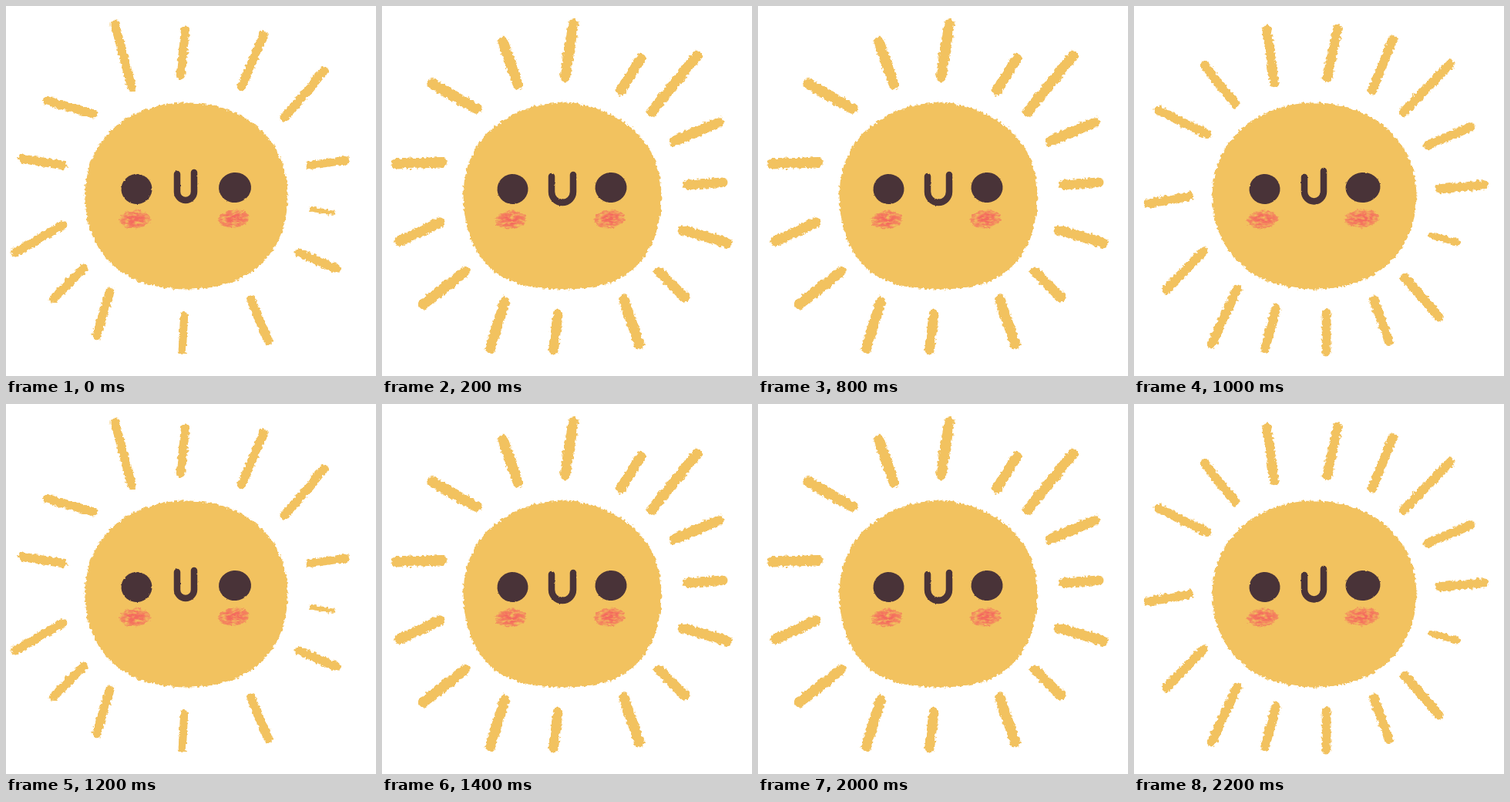
An HTML page that plays this animation: 480 by 480 pixels, repeating every 2400 ms.

```html
<!DOCTYPE html>
<html lang="en">
<head>
<meta charset="utf-8">
<title>Crayon sun</title>
<style>
  html, body { margin: 0; width: 100%; height: 100%; overflow: hidden; background: #fff; }
  svg { display: block; width: 100vw; height: 100vh; }
</style>
</head>
<body>
<svg id="stage" viewBox="0 0 480 480"></svg>
<script>
const STEP = 200;
const YELLOW = '#f2c25f', DARK = '#493338', PINK = '#f46a5e';
const CX = 234, CY = 246;

// Each ray: angle of its foot on the ring, heading (degrees clockwise from up), length
const poses = [
  {
    rx: 131.5, bulge: 0.03, sag: 0.01, eye: 21, cheek: 20,
    mouth: { left: 222, right: 244, topL: 218, topR: 216 },
    ring: 152, thick: 11.5,
    rays: [
      [333, 345, 93], [357, 6, 68], [27, 23, 82], [52, 40, 89], [76, 82, 56],
      [96, 101, 33], [117, 113, 62], [148, 157, 67], [181, 183, 53], [219, 197, 68],
      [235, 225, 65], [257, 240, 80], [284, 279, 62], [312, 286, 71]
    ]
  },
  {
    rx: 128.5, bulge: 0.035, sag: 0.035, eye: 20.5, cheek: 20,
    mouth: { left: 220, right: 248, topL: 221, topR: 219 },
    ring: 149, thick: 13.5,
    rays: [
      [1, 9, 80], [29, 32, 59], [47, 39, 104], [64, 67, 73], [85, 86, 56],
      [106, 106, 71], [128, 135, 57], [149, 161, 72], [182, 187, 57], [209, 197, 74],
      [232, 232, 80], [258, 245, 68], [286, 268, 69], [316, 299, 77], [338, 341, 69]
    ]
  },
  {
    rx: 132.5, bulge: 0.02, sag: 0.01, eye: 22.5, cheek: 22,
    mouth: { left: 221, right: 246, topL: 222, topR: 214 },
    ring: 149, thick: 12,
    rays: [
      [340, 352, 80], [6, 12, 74], [29, 22, 80], [47, 44, 96], [66, 67, 69],
      [87, 85, 67], [109, 105, 42], [132, 139, 77], [150, 160, 66], [174, 180, 59],
      [199, 195, 63], [220, 205, 88], [244, 224, 78], [270, 260, 63], [300, 296, 79],
      [319, 322, 73]
    ]
  }
];

const rad = deg => deg * Math.PI / 180;

// Ellipse that swells on its diagonals, more so towards the bottom
function body({ rx, bulge, sag }) {
  const points = [];
  for (let deg = 0; deg < 360; deg += 4) {
    const t = rad(deg);
    const r = 1 + (bulge + sag * Math.sin(t)) * Math.sin(2 * t) ** 2;
    points.push([CX + rx * r * Math.cos(t), CY + 0.5 + 121 * r * Math.sin(t)]);
  }
  return `<polygon fill="${YELLOW}" points="${points.join(' ')}"/>`;
}

function ray([angle, heading, length], { ring, thick }) {
  const a = rad(angle), h = rad(heading);
  const foot = ring + 9 * Math.sin(a) ** 2;
  const width = thick * Math.min(1, length / 60);
  const at = d => [CX + foot * Math.sin(a) + d * Math.sin(h), CY - foot * Math.cos(a) - d * Math.cos(h)];
  const inset = width * 0.4;
  return `<path d="M${at(inset)}L${at(length - inset)}" stroke-width="${width}"/>`;
}

function mouth({ left, right, topL, topR }) {
  const r = (right - left) / 2, turn = 241;
  return `<path fill="none" stroke="${DARK}" stroke-width="8.5" stroke-linecap="round"
    d="M${left} ${topL}V${turn}A${r} ${r} 0 0 0 ${right} ${turn}V${topR}"/>`;
}

const ellipse = (cx, cy, rx, ry) =>
  `<ellipse cx="${cx}" cy="${cy}" rx="${rx}" ry="${ry}" transform="rotate(-5 ${cx} ${cy})"/>`;

const area = 'filterUnits="userSpaceOnUse" x="0" y="0" width="480" height="480" color-interpolation-filters="sRGB"';

const roughen = (id, seed, scale) => `<filter id="${id}" ${area}>
  <feTurbulence type="fractalNoise" baseFrequency="0.25" numOctaves="2" seed="${seed}"/>
  <feDisplacementMap in="SourceGraphic" scale="${scale}" xChannelSelector="R" yChannelSelector="G"/>
  <feGaussianBlur stdDeviation="0.55"/>
</filter>`;

// Wax grain: wobbly edge, then noise thins the fill
const grain = (id, seed) => `<filter id="${id}" ${area}>
  <feTurbulence type="fractalNoise" baseFrequency="0.15 0.3" numOctaves="3" seed="${seed}" result="n"/>
  <feDisplacementMap in="SourceGraphic" in2="n" scale="7" xChannelSelector="R" yChannelSelector="G" result="s"/>
  <feColorMatrix in="n" values="0 0 0 0 0  0 0 0 0 0  0 0 0 0 0  0 0 2.4 0 -0.4"/>
  <feComposite in="s" operator="in"/>
  <feGaussianBlur stdDeviation="0.4"/>
</filter>`;

const blush = `<radialGradient id="blush">
  <stop offset="0.4" stop-color="${PINK}"/>
  <stop offset="1" stop-color="${PINK}" stop-opacity="0.6"/>
</radialGradient>`;

const drawPose = (p, i) => `
  <defs>${roughen('wax' + i, i + 3, 6)}${roughen('ink' + i, i + 11, 2)}${grain('grain' + i, i + 21)}</defs>
  <g class="pose" visibility="hidden">
    <g filter="url(#wax${i})" stroke="${YELLOW}" stroke-linecap="round">
      <g stroke="none">${body(p)}</g>${p.rays.map(r => ray(r, p)).join('')}
    </g>
    <g filter="url(#grain${i})" fill="url(#blush)">
      ${ellipse(167, 277, 20, 11.5)}${ellipse(295.5, 276, p.cheek, 11.5)}
    </g>
    <g filter="url(#ink${i})" fill="${DARK}">
      ${ellipse(169.5, 237.5, 20, 19.5)}${ellipse(297, 235.5, p.eye, 19.5)}${mouth(p.mouth)}
    </g>
  </g>`;

const stage = document.getElementById('stage');
stage.innerHTML = `<defs>${blush}</defs>` + poses.map(drawPose).join('');
const groups = [...stage.querySelectorAll('.pose')];

const start = performance.now();
function tick() {
  const current = Math.floor((performance.now() - start) / STEP) % groups.length;
  groups.forEach((g, i) => g.setAttribute('visibility', i === current ? 'visible' : 'hidden'));
  requestAnimationFrame(tick);
}
tick();
</script>
</body>
</html>
```
